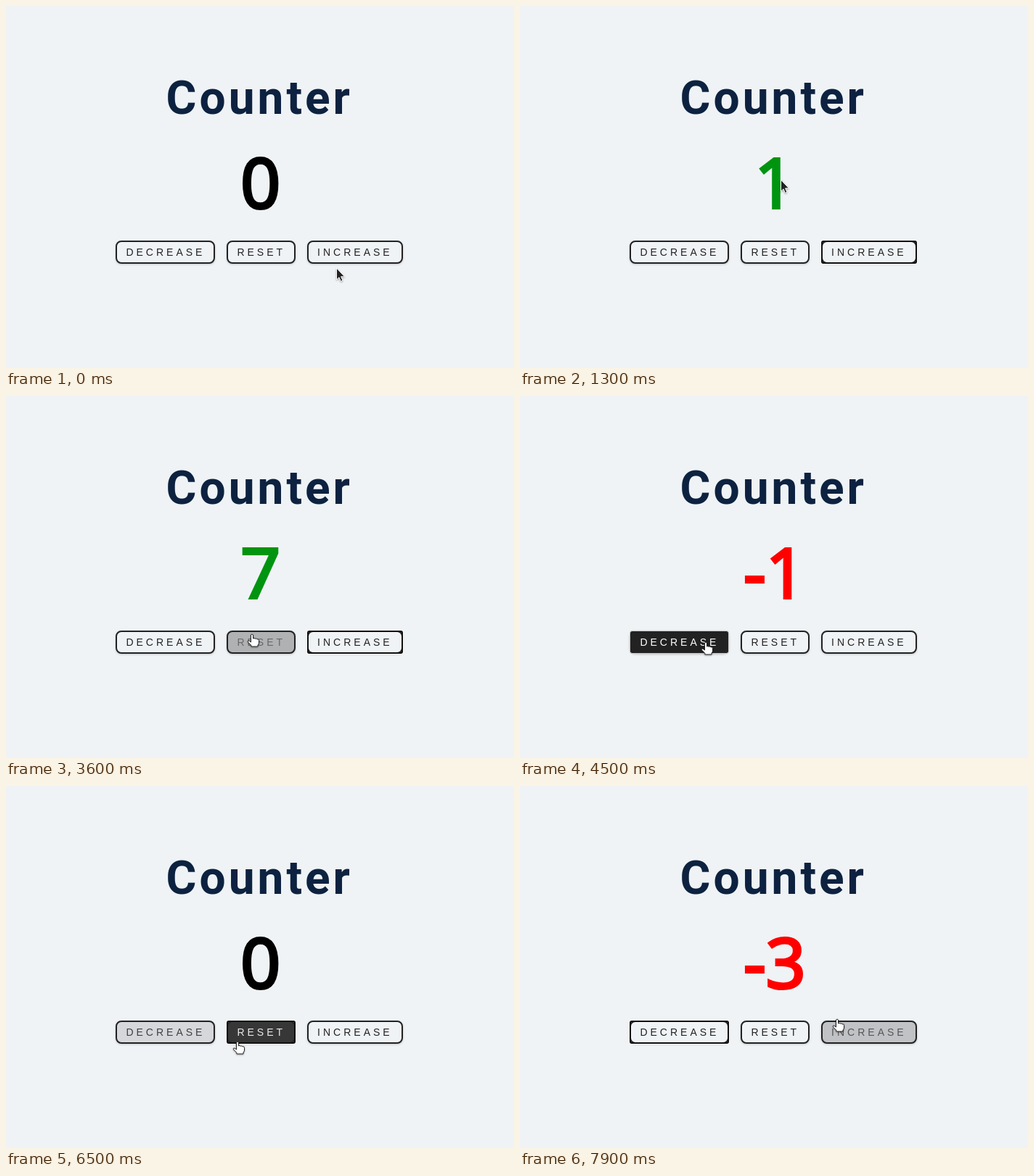
An HTML page for the animation above (8000 ms loop, 700 px wide and 500 px high).

```html
<!DOCTYPE html>
<html lang="en">
<head>
<meta charset="utf-8">
<title>Counter</title>
<style>
  html, body { margin: 0; width: 100%; height: 100%; overflow: hidden; background: #eff3f6; }
  #stage { position: relative; width: 700px; height: 500px; overflow: hidden; }
  svg { position: absolute; inset: 0; }
  #title { font: 700 64px Roboto, sans-serif; letter-spacing: 4px; fill: #0d2240; }
  /* Regular weight thickened by a stroke, like a synthesized bold */
  #value { font: 400 96px "Open Sans", sans-serif; text-anchor: middle; stroke-width: 4px; stroke-linejoin: miter; }
  #buttons { position: absolute; left: 151.4px; top: 324px; display: flex; gap: 16px; }
  .btn {
    position: relative; box-sizing: border-box; height: 32px; padding: 6px 12px;
    border: 2px solid #222; border-radius: 8px; box-shadow: 0 1px 3px rgba(0, 0, 0, .2);
    font: 14px/16px "Liberation Sans", Arial, sans-serif; letter-spacing: 4px; white-space: nowrap;
  }
  .btn::after { content: ""; position: absolute; inset: -2px; border-radius: 3px; }
  .focus::after { border: 2px solid #101010; box-shadow: 0 0 0 1px rgba(255, 255, 255, .7); }
  .fresh::after { border: 1px solid #c8c8c8; box-shadow: inset 0 0 0 2px #222; }
  #cursor { filter: drop-shadow(0 1px 1px rgba(0, 0, 0, .35)); }
</style>
</head>
<body>
<div id="stage">
  <svg width="700" height="500">
    <text id="title" x="220.6" y="149">Counter</text>
    <text id="value" x="350.8" y="279">0</text>
  </svg>
  <div id="buttons">
    <div class="btn">DECREASE</div>
    <div class="btn">RESET</div>
    <div class="btn">INCREASE</div>
  </div>
  <svg width="700" height="500">
    <g id="cursor">
      <path id="arrow" fill="#222" stroke="#fff" d="M.5 0V16L4 12.8 6.4 18.3 9 17.2 6.6 11.8H11.5Z"/>
      <path id="hand" fill="#fff" stroke="#222" stroke-linejoin="round"
        d="M-1.5 1Q0-1 1.5 1V6Q3 4.8 4.2 6.3 5.8 5.3 6.9 6.9 9.5 6.2 9.5 8.5V12Q9.3 14 8 15V17H-1.2V15.3L-5.6 10.8Q-6.3 8.6-4 9L-1.5 11Z"/>
    </g>
  </svg>
</div>
<script>
const LOOP = 8000, STEP = 100, FADE = 300, SETTLE = 150;
const NONE = -1, DEC = 0, RESET = 1, INC = 2;

// Where the pointer rests, for how long, what it clicks, and the point it passes on the way there
const visits = [
  { button: NONE, enter: 0, leave: 100, at: [455, 362], clicks: [] },
  { button: INC, enter: 260, leave: 1000, at: [460, 331], clicks: [700] },
  { button: INC, enter: 1560, leave: 2650, at: [460, 331], clicks: [1700, 1900, 2200, 2350, 2400, 2500], via: [353, 235] },
  { button: RESET, enter: 3505, leave: 4080, at: [341, 332], clicks: [3900], via: [322, 230] },
  { button: DEC, enter: 4170, leave: 5350, at: [256, 340], clicks: [4500, 4700, 5000] },
  { button: RESET, enter: 5460, leave: 6470, at: [327, 355], clicks: [6100], via: [309, 222] },
  { button: DEC, enter: 6460, leave: 7450, at: [256, 340], clicks: [6900, 7300, 7400] },
  { button: INC, enter: 7830, leave: LOOP, at: [455, 333], clicks: [], via: [330, 285] }
];
const clicks = visits.flatMap(({ button, clicks }) => clicks.map(time => ({ time, button })));

const $ = id => document.getElementById(id);
const buttons = [...document.querySelectorAll(".btn")];
const clamp = v => Math.min(1, Math.max(0, v));
const ease = p => p * p * (3 - 2 * p);
const mix = (a, b, p) => `rgb(${a.map((v, i) => Math.round(v + (b[i] - v) * p))})`;

const fill = (button, t) => Math.max(0, ...visits
  .filter(v => v.button === button && v.enter <= t)
  .map(v => clamp((Math.min(t, v.leave) - v.enter) / FADE) - clamp((t - v.leave) / FADE)));

const count = past => past.reduce((n, { button }) => button === RESET ? 0 : n + button - RESET, 0);

// Eased quadratic curve from one resting place to the next, through `via` halfway
function position(t) {
  const i = Math.max(1, visits.findLastIndex(v => v.leave <= t) + 1);
  const from = visits[i - 1], to = visits[Math.min(i, visits.length - 1)];
  const p = ease(clamp((t - from.leave) / (to.enter + SETTLE - from.leave)));
  return [0, 1].map(k => {
    const a = from.at[k], b = to.at[k], middle = (a + b) / 2;
    const bulge = to.via ? to.via[k] - middle : 0;
    return Math.round(a + (b - a) * p + 4 * bulge * p * (1 - p));
  });
}

function draw(t) {
  const past = clicks.filter(c => c.time <= t);
  const last = past[past.length - 1];
  const firstOfRun = past.findLast((c, i) => c.button !== past[i - 1]?.button);

  const value = count(past);
  const color = value > 0 ? "#009410" : value < 0 ? "#f00" : "#000";
  $("value").textContent = value;
  $("value").setAttribute("fill", color);
  $("value").setAttribute("stroke", color);

  buttons.forEach((el, i) => {
    const p = fill(i, t), focused = last?.button === i;
    el.style.background = mix([240, 243, 246], [34, 34, 34], p);
    el.style.color = mix([34, 34, 34], [255, 255, 255], p);
    el.classList.toggle("focus", focused);
    el.classList.toggle("fresh", focused && t - firstOfRun.time < STEP);
  });

  const over = visits.some(v => v.button !== NONE && v.enter <= t && t < v.leave);
  $("hand").style.display = over ? "" : "none";
  $("arrow").style.display = over ? "none" : "";
  $("cursor").setAttribute("transform", `translate(${position(t)})`);
}

const start = performance.now();
function tick() {
  const t = (performance.now() - start) % LOOP;
  draw(Math.floor(t / STEP) * STEP);
  requestAnimationFrame(tick);
}
tick();
</script>
</body>
</html>
```
